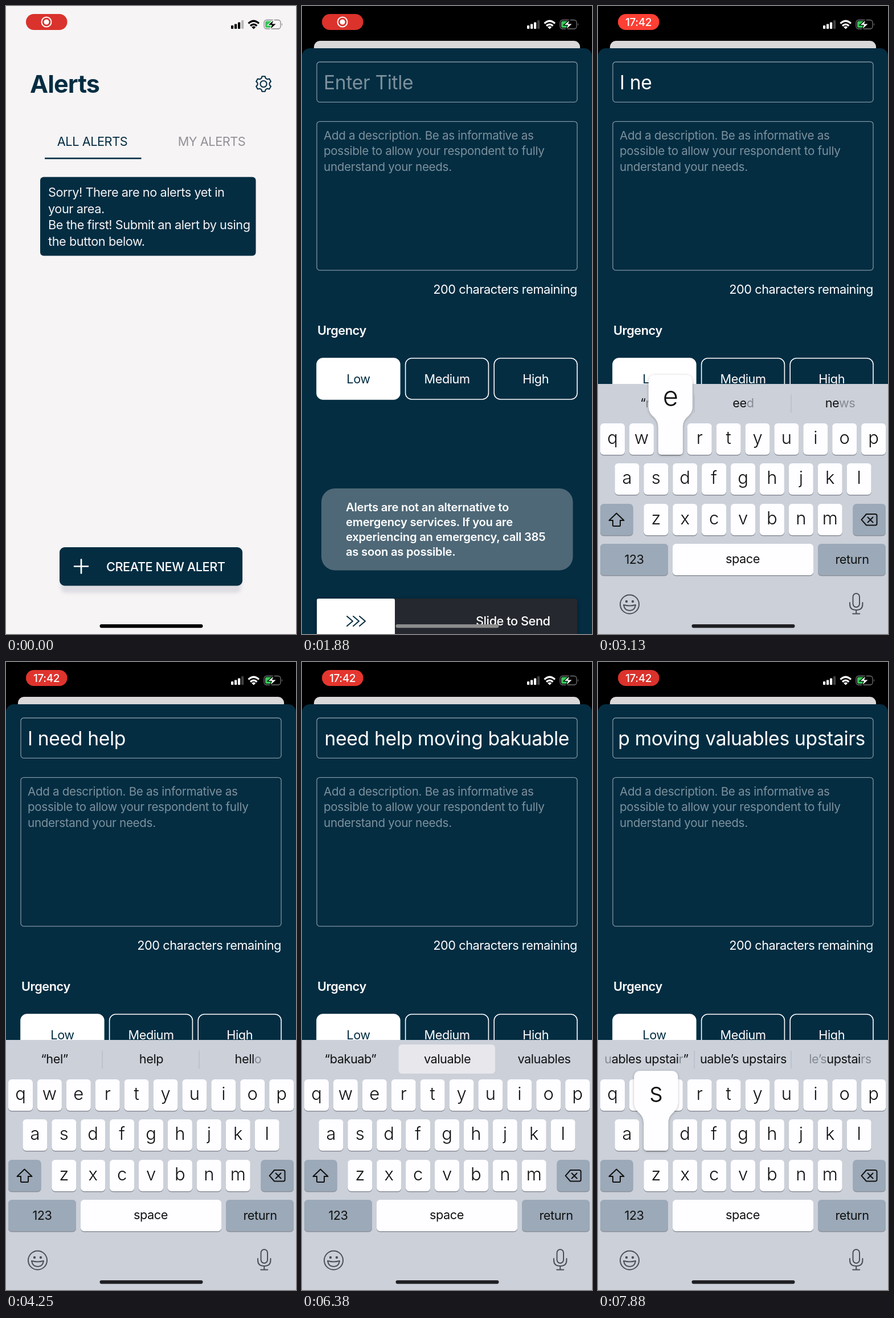
An HTML page for the animation above (8000 ms loop, 509 by 1100 pixels).

```html
<!DOCTYPE html>
<html lang="en">
<head>
<meta charset="utf-8">
<title>Alerts</title>
<style>
  html, body { margin: 0; width: 100%; height: 100%; overflow: hidden; background: #000; }
  svg { display: block; width: 509px; height: 1100px; }
  text { font: 400 21.7px Inter, sans-serif; letter-spacing: -.02em; white-space: pre; }
  .mid { text-anchor: middle; }
  .end { text-anchor: end; }
  .semi { font-weight: 600; }
  .medium { font-weight: 500; }
  .heading { font-size: 43px; font-weight: 700; }
  .field { font-size: 33.6px; letter-spacing: -.0095em; }
  .hint { font-size: 20.6px; letter-spacing: -.0145em; fill: #7c909c; }
  .notice { font-size: 20.2px; font-weight: 600; letter-spacing: -.012em; }
  .clock { font-size: 19px; font-weight: 500; }
  .letter { font-size: 31px; font-weight: 350; letter-spacing: 0; }
  .big { font-size: 47px; font-weight: 350; letter-spacing: 0; }
  .line { fill: none; stroke-linecap: round; stroke-linejoin: round; stroke-width: 2; }
</style>
</head>
<body>
<svg id="stage" viewBox="0 0 509 1100"></svg>
<script>
const NAVY = '#042d42', STEP = 125, LOOP = 8000;

const text = (x, y, str, cls = '', fill = '#fff', id = '') =>
  `<text x="${x}" y="${y}" class="${cls}" fill="${fill}" id="${id}">${str}</text>`;
const lines = (x, y, pitch, list, cls, fill) =>
  list.map((s, i) => text(x, y + i * pitch, s, cls, fill)).join('');
const rect = (x, y, w, h, r, fill, more = '') =>
  `<rect x="${x}" y="${y}" width="${w}" height="${h}" rx="${r}" fill="${fill}" ${more}/>`;
const path = (d, stroke, more = '') => `<path class="line" d="${d}" stroke="${stroke}" ${more}/>`;

function gear(cx, cy) {
  const points = [];
  for (let i = 0; i < 6; i++)
    for (const [turn, r] of [[-.36, 10.6], [-.2, 13.6], [.2, 13.6], [.36, 10.6]]) {
      const a = (i + .5) * Math.PI / 3 + turn;
      points.push((cx + r * Math.cos(a)).toFixed(1) + ' ' + (cy + r * Math.sin(a)).toFixed(1));
    }
  return path('M' + points.join('L') + 'Z', NAVY) +
    `<circle class="line" cx="${cx}" cy="${cy}" r="5.6" stroke="${NAVY}"/>`;
}

const home = `
  <g id="card" clip-path="url(#cardClip)">
    ${rect(0, 0, 509, 1100, 0, '#f6f4f5')}
    ${text(42, 152, 'Alerts', 'heading', NAVY)}${gear(452, 136.5)}
    ${text(151.5, 245, 'ALL ALERTS', 'mid', NAVY)}${text(361, 245, 'MY ALERTS', 'mid', '#919096')}
    ${rect(68, 265.6, 169.5, 2.6, 0, NAVY)}
    ${rect(60, 299.5, 378.5, 138, 6, NAVY)}
    ${lines(74, 334, 28.5, ['Sorry! There are no alerts yet in', 'your area.',
      'Be the first! Submit an alert by using', 'the button below.'], '', '#f4f4f5')}
    ${rect(96, 962, 317, 66, 9, '#dddce2', 'filter="url(#soft)"')}
    ${rect(94, 948, 321, 67.5, 9, NAVY)}
    ${path('M120 981.5h24m-12 -12v24', '#fff', 'style="stroke-width:2.7"')}
    ${text(176, 990, 'CREATE NEW ALERT', 'medium')}
    <rect id="dim" width="509" height="1100"/>
  </g>`;

const outline = (x, y, w, h, r, color, width) =>
  rect(x, y, w, h, r, 'none', `stroke="${color}" stroke-width="${width}"`);

const sheet = `
  <g id="sheet">
    ${rect(0, 74, 509, 1100, 14, NAVY)}
    ${outline(26, 98, 457, 70.3, 5, '#8194a0', 1.3)}
    <g clip-path="url(#fieldClip)">${text(38, 146, '', 'field', '#fff', 'title')}</g>
    ${outline(26, 202.3, 457, 260.5, 5, '#8194a0', 1.3)}
    ${lines(38, 234, 27.4, ['Add a description. Be as informative as',
      'possible to allow your respondent to fully', 'understand your needs.'], 'hint', '')}
    ${text(483, 503.5, '200 characters remaining', 'end')}
    ${text(27, 576, 'Urgency', 'semi')}
    ${['Low', 'Medium', 'High'].map((s, i) =>
      rect(26 + i * 155.6, 617, 145.8, 72, 11, i ? 'none' : '#fff', 'stroke="#fff" stroke-width="1.6"') +
      text(99 + i * 155.6, 661, s, 'mid', i ? '#fff' : NAVY)).join('')}
    ${rect(34, 845, 441.5, 143.5, 24, '#4e6877')}
    ${lines(77, 885, 26, ['Alerts are not an alternative to', 'emergency services. If you are',
      'experiencing an emergency, call 385', 'as soon as possible.'], 'notice', '#fff')}
    ${rect(26, 1040, 457, 80, 4, '#021a28', 'filter="url(#soft)"')}
    ${rect(26, 1038, 457, 80, 4, '#25282e')}${rect(26, 1038, 137, 80, 3, '#fff')}
    ${[79, 90, 101].map(x => path(`M${x} 1069l10 8.5l-10 8.5`, NAVY)).join('')}
    ${text(305, 1085, 'Slide to Send', 'medium')}
  </g>`;

// Keyboard
const ROWS = [['qwertyuiop', 4, 731], ['asdfghjkl', 29.4, 801], ['zxcvbnm', 80.3, 872]];
const keyAt = {};
const key = (x, y, w, fill, id = '') =>
  rect(x, y + 1.5, w, 55, 6, '#8b9099') + rect(x, y, w, 55, 6, fill, `id="${id}"`);
const GREY = '#9ba9b8', ICON = '#4c5058';

const letterKeys = ROWS.map(([row, x0, y]) => [...row].map((c, i) => {
  const x = x0 + i * 50.9;
  keyAt[c] = { x, y };
  return key(x, y, 43, '#fefdff') + text(x + 21.5, y + 36, c, 'mid letter', '#111', 'key-' + c);
}).join('')).join('');

const keyboard = `
  <g id="keyboard">
    ${rect(0, 662, 509, 440, 0, '#cbd0d9')}
    ${rect(169.5, 670, 169.5, 51, 6, '#e7e7ec', 'id="pick"')}
    <g id="dividers">${path('M169 681v31M339 681v31', '#b5bbc5', 'style="stroke-width:1.2"')}</g>
    ${[85, 255, 425].map((x, i) => text(x, 703, '', 'mid', '#111', 'word' + i)).join('')}
    ${letterKeys}
    ${key(4, 872, 57.5, GREY, 'shift')}${key(447.5, 872, 57.5, GREY)}
    ${path('M32.5 888.5L19.5 901h6.5v8.5q0 1.5 1.5 1.5h10q1.5 0 1.5 -1.5V901h6.5Z', '#111', 'id="arrow"')}
    ${path('M471 890h15.5q3 0 3 3v13.5q0 3 -3 3h-15.5l-8.5 -9.7ZM473.5 895.5l9 9m0 -9l-9 9', '#111')}
    ${key(4, 942, 119, GREY)}${key(131, 942, 247, '#fefdff', 'space')}${key(386, 942, 119, GREY)}
    ${text(63.5, 977, '123', 'mid', '#111')}${text(254, 976, 'space', 'mid', '#111')}
    ${text(446, 977, 'return', 'mid', '#111')}
    <circle class="line" cx="55.5" cy="1048" r="16.5" stroke="${ICON}"/>
    <circle cx="50" cy="1043" r="2.2" fill="${ICON}"/><circle cx="61" cy="1043" r="2.2" fill="${ICON}"/>
    ${path('M45 1049q10.5 3 21 0q-1.5 10 -10.5 10t-10.5 -10Z', ICON)}
    <rect class="line" x="447.5" y="1029" width="11.5" height="24" rx="5.7" stroke="${ICON}"/>
    ${path('M442 1045v3q0 10 11.2 10t11.2 -10v-3M453.2 1058v6.5m-6 0h12', ICON)}
    <g id="popup">
      <path id="bubble" fill="#fefdff" filter="url(#lift)"/>
      ${text(0, 0, '', 'mid big', '#111', 'popChar')}
    </g>
  </g>`;

const status = `
  <rect id="pill" x="35" y="14" width="72.5" height="28" rx="14"/>
  <g id="record"><circle class="line" cx="71" cy="28" r="8.5" stroke="#fff"/>
    <circle cx="71" cy="28" r="4.6" fill="#fff"/></g>
  ${text(71, 35, '17:42', 'mid clock', '#fff', 'clock')}
  <g id="status">
    ${[6, 8.5, 11.5, 15].map((h, i) =>
      rect(395 + i * 6, 40 - h, 4.2, h, 1, 'currentColor', i == 3 ? 'opacity=".25"' : '')).join('')}
    <g fill="none" stroke="currentColor" stroke-width="3.2">
      <path d="M425.5 30.5q9.2 -8.5 18.4 0M429 34.7q5.7 -5.2 11.4 0"/></g>
    <path d="M431.2 37q3.5 -2.8 7 0l-3.5 3.5Z" fill="currentColor"/>
    <rect x="453" y="24.5" width="29" height="15.5" rx="4.5" fill="none" stroke="currentColor" stroke-width="1.3" opacity=".45"/>
    <path d="M484 30q2 2.2 0 4.5Z" fill="currentColor" opacity=".5"/>
    ${rect(455, 26.5, 12.5, 11.5, 2.5, '#34c759')}
    <path id="bolt" d="M470.5 23.5L459 33.7h7l-2.8 8L475 31h-7.200Z" fill="currentColor" stroke-width="1.2"/>
  </g>
  ${rect(164.5, 1083, 181, 6.2, 3.1, '#000', 'id="bar"')}`;

const stage = document.getElementById('stage');
stage.innerHTML = `
  <defs>
    <clipPath id="cardClip"><rect id="cardShape" width="509" height="1100"/></clipPath>
    <clipPath id="fieldClip"><rect x="36.5" y="99" width="435" height="68"/></clipPath>
    <filter id="soft" x="-10%" y="-30%" width="120%" height="160%"><feGaussianBlur stdDeviation="3"/></filter>
    <filter id="lift" x="-20%" y="-20%" width="140%" height="140%">
      <feDropShadow dx="0" dy="1" stdDeviation="2" flood-opacity=".3"/></filter>
  </defs>
  ${rect(0, 0, 509, 1100, 0, '#000')}${home}${sheet}${keyboard}${status}`;

const $ = id => document.getElementById(id);
const set = (id, attrs) => { for (const k in attrs) $(id).setAttribute(k, attrs[k]); };
const show = (id, on) => { $(id).style.display = on ? '' : 'none'; };

// Keystrokes, timed in steps
const type = (str, start, rate) => [...str].map((char, i) => ({ char, at: start + i * rate }));
const strokes = [
  ...type('I need help', 21, 1.2), ...type(' moving bakuable', 35, 1),
  ...type('s', 52, 1), ...type('upstairs', 54.6, 1.2),
];
const CORRECTED = 53;

// Words offered from each step on; _text_ is faded
const offers = [
  [0, 'I', 'The', 'I’m'], [22, '“I”', 'I’m', 'I’ll'], [25, '“_n_', 'ee_d_', 'ne_ws_'],
  [26, '“ne”', 'need', 'news'], [30, 'to', 'a', 'you'], [32, '“he”', 'help', 'her'],
  [33, '“hel”', 'help', 'hell_o_'], [36, 'me', 'with', 'you'], [38, '“mo”', 'more', 'move'],
  [41, '“movi”', 'moving', 'movie'], [44, 'to', 'the', 'in'], [46, '“ba”', 'back', 'bad'],
  [49, '“baku”', 'bake', 'baker'], [51, '“bakuab”', 'valuable', 'valuables'],
  [54, 'and', 'to', 'from'], [57, '“up”', 'up', 'upon'], [60, '“upst”', 'upstairs', 'upstate'],
  [63, '_u_ables upstai_r_”', 'uable’s upstairs', '_le’s_upstai_rs_'],
];

// Share of a critically damped move completed
const spring = (ms, rate) => {
  const x = Math.max(0, ms) / 1000 * rate;
  return 1 - (1 + x) * Math.exp(-x);
};
const grey = v => { v = Math.round(v); return `rgb(${v},${v},${v})`; };

function drawPopup(stroke) {
  const c = stroke && stroke.char.toLowerCase(), at = keyAt[c];
  show('popup', at);
  if (!at) return;
  const { x, y } = at, left = Math.min(428, Math.max(4, x - 17)), right = left + 77, r = x + 43;
  set('bubble', { d: `M${left + 12} ${y - 85}H${right - 12}q12 0 12 12V${y - 30}
    C${right} ${y - 10} ${r} ${y - 14} ${r} ${y + 8}V${y + 49}q0 6 -6 6H${x + 6}q-6 0 -6 -6V${y + 8}
    C${x} ${y - 14} ${left} ${y - 10} ${left} ${y - 30}V${y - 73}q0 -12 12 -12Z` });
  set('popChar', { x: left + 38.5, y: y - 31 });
  $('popChar').textContent = stroke.char;
}

function drawKeyboard(step, ms) {
  const rise = spring(ms - 2150, 18.26), up = rise > 0;
  show('keyboard', up);
  set('keyboard', { transform: `translate(0 ${438 * (1 - rise)})` });

  const done = strokes.filter(s => s.at <= step + 1e-6), last = done[done.length - 1];
  const pressed = last && step - last.at < .95 ? last : null;
  const caps = step < 22;
  for (const c in keyAt) $('key-' + c).textContent = caps ? c.toUpperCase() : c;
  set('shift', { fill: caps ? '#fefdff' : GREY });
  $('arrow').style.fill = caps ? '#111' : 'none';
  set('space', { fill: pressed && pressed.char == ' ' ? GREY : '#fefdff' });
  drawPopup(pressed);

  const words = offers.filter(o => o[0] <= step).pop();
  for (let i = 0; i < 3; i++)
    $('word' + i).innerHTML = words[i + 1].replace(/_(.*?)_/g, '<tspan fill="#858a93">$1</tspan>');
  const picked = words[2] == 'valuable';
  show('pick', picked);
  show('dividers', !picked);

  let value = done.map(s => s.char).join('');
  if (step >= CORRECTED) value = value.replace('bakuables', 'valuables ');
  const title = $('title');
  title.textContent = value || 'Enter Title';
  set('title', { fill: value ? '#fff' : '#7c909c' });
  set('title', { x: Math.min(38, 469 - title.getComputedTextLength()) });
  return up;
}

function draw(step) {
  const ms = step * STEP;
  const back = spring(ms - 643, 12.1), rise = spring(ms - 643, 18.26);
  const scale = 1 - .0825 * back;
  set('card', { transform: `translate(${254.5 * (1 - scale)} ${61 * back}) scale(${scale})` });
  set('cardShape', { rx: back ? 50 - 38 * back : 0 });
  set('dim', { opacity: .115 * back });
  set('sheet', { transform: `translate(0 ${1026 * (1 - rise)})` });
  const keysUp = drawKeyboard(step, ms);

  const light = Math.min(1, Math.max(0, (step - 6) * .38));
  $('status').style.color = grey(255 * light);
  set('bolt', { stroke: step < 7 ? '#f6f4f5' : '#000' });
  set('bar', { fill: keysUp ? '#202024' : grey(140 * Math.min(1, 1.45 * light)) });

  const glow = .5 - .5 * Math.cos(ms / 1000 * Math.PI);
  set('pill', { fill: `rgb(${218 + 37 * glow},${50 + 13 * glow},${44 + 8 * glow})` });
  show('record', step < 20);
  show('clock', step >= 20);
}

const start = performance.now();
let shown = -1;
function tick() {
  const step = Math.floor((performance.now() - start) % LOOP / STEP);
  if (step != shown) draw(shown = step);
  requestAnimationFrame(tick);
}
tick();
</script>
</body>
</html>
```
